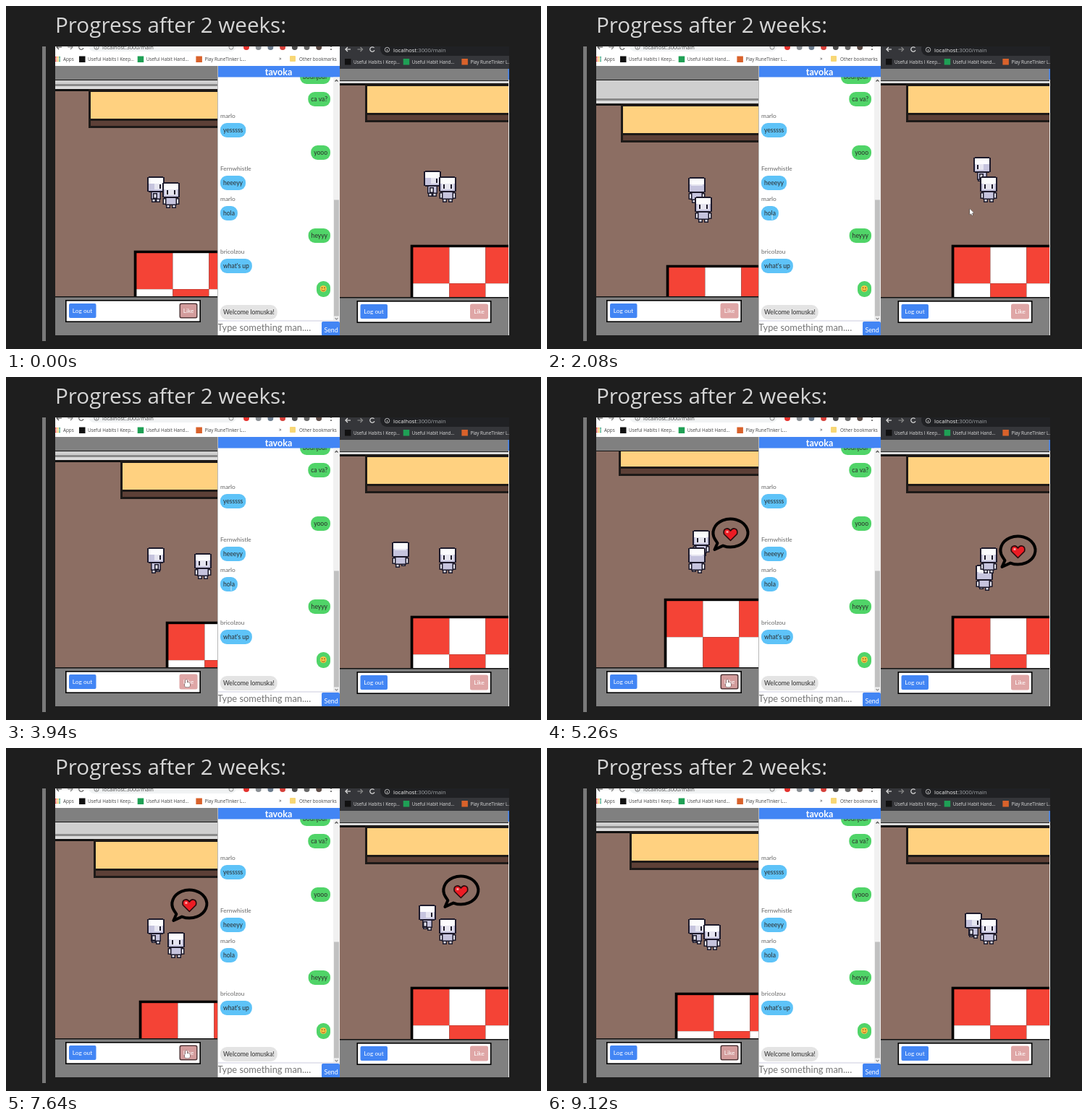
Write an HTML page with a canvas that moves like this. It is 739x475 px and loops after 9580 ms.

```html
<!DOCTYPE html>
<html lang="en">
<head>
<meta charset="utf-8">
<title>Progress after 2 weeks</title>
<style>
html, body { margin: 0; width: 100%; height: 100%; overflow: hidden; background: #1e1e1e; }
canvas { display: block; }
</style>
</head>
<body>
<canvas id="stage" width="739" height="475"></canvas>
<script>
const ctx = document.getElementById('stage').getContext('2d');
const LOOP = 9580;
const STEP = LOOP / 125;
const UI = '"Open Sans", sans-serif';
const CHAT = 'Lato, sans-serif';
const BLUE = '#4285f4', PINK = '#dfa6a6', GREEN = '#50d468';
const LIKED = 5180, LIKE_END = 8270;

// Turning points of the walker relative to the standing player: time, x, y.
const WALK = [
  [690, -21, -8], [1380, 47, -18], [1560, 47, -18], [1880, -9, -18], [2110, -9, -31],
  [2400, 30, -38], [3500, -72, 8], [3760, -72, -8], [3880, -65, -8], [4400, -65, 34],
  [4850, -6, 34], [5180, -6, 24], [5650, -6, 24], [6200, -26, -22], [6640, 41, -22],
  [7250, -45, 15], [7460, -45, -19], [7880, -5, -19], [8500, -70, -8], [9090, -21, -8]
];

const mix = (a, b, k) => a + (b - a) * k;
const ramp = (t, a, b) => Math.min(1, Math.max(0, (t - a) / (b - a)));

function walkAt(t) {
  let i = 1;
  while (i < WALK.length - 1 && t > WALK[i][0]) i++;
  const [t0, x0, y0] = WALK[i - 1], [t1, x1, y1] = WALK[i];
  const k = ramp(t, t0, t1);
  return { x: mix(x0, x1, k), y: mix(y0, y1, k) };
}

function heading(t) {
  const a = walkAt(t - 20), b = walkAt(t);
  const dx = b.x - a.x, dy = b.y - a.y;
  const moving = dx !== 0 || dy !== 0;
  if (!moving) return { dir: t > 5000 && t < 6000 ? 'up' : 'right', moving };
  const dir = Math.abs(dx) > Math.abs(dy) ? (dx > 0 ? 'right' : 'left') : (dy > 0 ? 'down' : 'up');
  return { dir, moving };
}

function box(x, y, w, h, color) {
  ctx.fillStyle = color;
  ctx.fillRect(x, y, w, h);
}

function pill(x, y, w, h, r, color) {
  ctx.fillStyle = color;
  ctx.beginPath();
  ctx.roundRect(x, y, w, h, r);
  ctx.fill();
}

function dot(x, y, r, color) {
  ctx.fillStyle = color;
  ctx.beginPath();
  ctx.arc(x, y, r, 0, 7);
  ctx.fill();
}

function arc(x, y, r, from, to, color, width) {
  ctx.strokeStyle = color;
  ctx.lineWidth = width;
  ctx.beginPath();
  ctx.arc(x, y, r, from, to);
  ctx.stroke();
}

function line(points, color, width) {
  ctx.strokeStyle = color;
  ctx.lineWidth = width;
  ctx.beginPath();
  points.forEach(([x, y]) => ctx.lineTo(x, y));
  ctx.stroke();
}

function chevron(x, y, dx, dy, color) {
  line([[x - dx - dy, y - dy - dx], [x, y], [x - dx + dy, y - dy + dx]], color, 1.3);
}

function text(s, x, y, size, color, font = UI, align = 'left', weight = 400) {
  ctx.font = `${weight} ${size}px ${font}`;
  ctx.textAlign = align;
  ctx.fillStyle = color;
  ctx.fillText(s, x, y);
}

function clipped(x, y, w, h, draw) {
  ctx.save();
  ctx.beginPath();
  ctx.rect(x, y, w, h);
  ctx.clip();
  draw();
  ctx.restore();
}

// x is the middle, y the top of the head; stride is -1, 0 or 1.
function sprite(x, y, dir, stride) {
  const ink = '#1d1a2b', lav = '#c6c4de', pale = '#e6e5f0';
  const part = (px, py, w, h, fill) => {
    box(px, py, w, h, ink);
    box(px + 1.5, py + 1.5, w - 3, h - 3, fill);
  };
  const side = dir === 'left' || dir === 'right';
  ctx.save();
  ctx.translate(Math.round(x), Math.round(y));
  if (dir === 'left') ctx.scale(-1, 1);
  for (const s of [-1, 1]) {
    const lift = stride === s ? 2 : 0;
    if (!side) part(s * 8.5 - 3, 22, 6, 9, pale);
    part(s * (side ? 3 : 4) - 3, 29 - (side ? lift : 0), 6, 7 - (side ? 0 : lift), pale);
  }
  part(side ? -7 : -8, 19, side ? 14 : 16, 13, lav);
  if (side) part(-4 + stride * 2, 23, 6, 8, pale);
  box(-12, 1, 24, 20, ink);
  box(-10, 0, 20, 22, ink);
  box(-10, 2, 20, 18, lav);
  box(-10, 2, 20, 8, '#fbfbfd');
  if (dir === 'up') {
    box(-8, 10, 16, 2, pale);
  } else {
    box(side ? -2 : -8, 10, side ? 11 : 16, 8, pale);
    box(side ? 5 : 4, 11, 2, 6, ink);
    if (!side) box(-6, 11, 2, 6, ink);
  }
  ctx.restore();
}

function heartBubble(x, y) {
  ctx.save();
  ctx.translate(x, y);
  ctx.lineJoin = 'round';
  ctx.strokeStyle = '#000';
  ctx.lineWidth = 4;
  ctx.beginPath();
  ctx.ellipse(0, -1, 24, 19.5, 0, 2.67, 2.02 + Math.PI * 2);
  ctx.lineTo(-22, 22);
  ctx.lineTo(-18, 13);
  ctx.closePath();
  ctx.stroke();
  ctx.beginPath();
  ctx.moveTo(0, 9.5);
  ctx.lineTo(-9, 0.5);
  ctx.bezierCurveTo(-11, -8, -3, -9, 0, -4);
  ctx.bezierCurveTo(3, -9, 11, -8, 9, 0.5);
  ctx.closePath();
  ctx.fillStyle = '#ec1c24';
  ctx.fill();
  ctx.lineWidth = 1.6;
  ctx.strokeStyle = '#2a0a0c';
  ctx.stroke();
  box(-6, -4, 3, 3, '#ff9a9a');
  ctx.restore();
}

// Room in the coordinates of the right-hand window.
function room() {
  box(250, -50, 900, 600, '#8c6e63');
  box(250, -50, 900, 157, '#cfcfcf');
  box(250, 100, 900, 3, '#8a8a8a');
  box(250, 103, 900, 4, '#dcdcdc');
  box(250, 107, 900, 3, '#111');
  box(496, 107, 600, 54, '#1e1a18');
  box(499, 111, 600, 37, '#ffd180');
  box(499, 151, 600, 7, '#5d4037');
  box(558.7, 330.7, 500, 200, '#000');
  for (let r = 0; r < 3; r++)
    for (let c = 0; c < 8; c++)
      box(562.4 + c * 50, 334.2 + r * 50, 50, 50, (r + c) % 2 ? '#fff' : '#f44336');
}

// The remote view turns the walker a little late and keeps its own player on top.
function game(t, remote) {
  const a = walkAt(t);
  const look = heading(remote ? t - 160 : t);
  const stride = look.moving ? Math.floor(t / 150) % 2 * 2 - 1 : 0;
  const walker = () => sprite(610 + a.x, 236 + a.y, look.dir, stride);
  const stander = () => sprite(610, 236, 'down', 0);
  const order = !remote && a.y > 0 ? [stander, walker] : [walker, stander];
  room();
  order.forEach(draw => draw());
  if (t >= LIKED && t < LIKE_END) heartBubble(656.5 + a.x, 217 + a.y);
}

function hud(x, y, w, focused) {
  box(x, y, w, 31, '#000');
  box(x + 1.6, y + 1.6, w - 3.2, 27.8, '#fff');
  pill(x + 5, y + 5, 37.5, 20, 2, BLUE);
  text('Log out', x + 23.5, y + 18, 8.3, '#fff', CHAT, 'center');
  const lx = x + w - 29;
  pill(lx - 0.5, y + 4.5, 25, 21, 2.5, focused ? '#55393b' : PINK);
  pill(lx + 1, y + 6, 22, 18, 1.5, focused ? '#d39c9c' : PINK);
  text('Like', lx + 12, y + 18, 8.3, '#fff', CHAT, 'center');
}

function navIcons(x, y, gap, color) {
  chevron(x, y, -3, 0, color);
  line([[x, y], [x + 7, y]], color, 1.2);
  chevron(x + gap + 7, y, 3, 0, '#888');
  line([[x + gap, y], [x + gap + 7, y]], '#888', 1.2);
  arc(x + 2 * gap + 4, y, 3.2, 0.4, 5.6, color, 1.2);
}

function infoMark(x, y, color) {
  arc(x, y, 3.2, 0, 7, color, 0.9);
  box(x - 0.5, y - 0.5, 1, 2.3, color);
}

function bookmarks(x, y, color) {
  const marks = { 'Useful Habits I Keep...': '#111', 'Useful Habit Hand...': '#1fa055', 'Play RuneTinker L...': '#d9622b' };
  Object.entries(marks).forEach(([name, c], i) => {
    box(x + i * 80.7, y - 6.5, 8.5, 8.5, c);
    text(name, x + i * 80.7 + 12, y, 6.3, color);
  });
}

function leftTop() {
  box(68, 56, 393, 27, '#fff');
  pill(114, 46, 204, 17, 8, '#f1f3f4');
  navIcons(70, 57, 15, '#555');
  infoMark(125, 57, '#666');
  text('localhost:3000/main', 133, 60, 7.5, '#444');
  arc(311, 57, 3, 0, 7, '#777', 0.9);
  ['#e5322d', '#8a8f94', '#6b7b8d', '#d6403a', '#4a4a4a', '#666', '#5b4a45']
    .forEach((c, i) => dot(332 + i * 16.7, 57, 4, c));
  dot(449, 56, 1, '#555');
  dot(449, 60, 1, '#555');
  for (let i = 0; i < 9; i++)
    box(68 + i % 3 * 2.6, 70 + Math.floor(i / 3) * 2.6, 1.8, 1.8, ['#e55', '#fb3', '#4a8'][i % 3]);
  text('Apps', 79, 76, 6.3, '#444');
  bookmarks(101, 76, '#444');
  text('»', 377, 75, 7, '#444');
  pill(392, 69, 8, 8, 1, '#f8d775');
  text('Other bookmarks', 405, 76, 6.3, '#444');
}

function rightTop() {
  box(461, 56, 234, 31, '#35363a');
  pill(517, 50, 200, 19, 9, '#202124');
  navIcons(469, 60, 16.5, '#ddd');
  infoMark(526.5, 60.5, '#ccc');
  text('localhost', 535, 63.5, 7.7, '#f1f1f1');
  text(':3000/main', 535 + ctx.measureText('localhost').width, 63.5, 7.7, '#a0a4a8');
  bookmarks(468, 79.5, '#dcdcdc');
}

function bubble(s, y, color, own) {
  ctx.font = `8.55px ${CHAT}`;
  const w = ctx.measureText(s).width + 8;
  const x = own ? 448 - w : 296;
  pill(x, y, w, 20, 9, color);
  text(s, x + 4, y + 13, 8.55, '#2b2b2b', CHAT);
}

const sent = (s, y) => bubble(s, y, GREEN, true);

function received(name, s, y) {
  text(name, 296, y - 7, 8.4, '#666', CHAT);
  bubble(s, y, '#5ec3f8');
}

function smiley(x, y) {
  dot(x, y, 4.6, '#f9c646');
  for (const s of [-1, 1]) dot(x + s * 1.7, y - 1.2, 0.8, '#5b3a12');
  arc(x, y + 0.3, 2.6, 0.3, 2.8, '#8a4a1c', 0.9);
}

function chat() {
  box(292, 83, 169, 373, '#fff');
  sent('bounjour', 88);
  box(292, 83, 169, 15.5, BLUE);
  text('tavoka', 376.5, 95.5, 12.5, '#fff', CHAT, 'center', 700);
  sent('ca va?', 119);
  received('marlo', 'yesssss', 162);
  sent('yooo', 193);
  received('Fernwhistle', 'heeeyy', 235);
  received('marlo', 'hola', 277);
  sent('heyyy', 308);
  received('bricolzou', "what's up", 350);
  pill(429, 381, 19, 22, 9, GREEN);
  smiley(438.3, 391.5);
  bubble('Welcome lomuska!', 414, '#e4e4e4');
  box(452, 98.5, 9, 337, '#f1f1f1');
  box(453, 268.5, 7, 161, '#c1c1c1');
  chevron(456.5, 102.5, 0, -2, '#555');
  chevron(456.5, 434, 0, 2, '#999');
  box(292, 435.5, 169, 1, '#ccd');
  text('Type something man....', 292, 450, 12.9, '#757575', CHAT);
  pill(436, 437, 25, 20, 2, BLUE);
  text('Send', 449, 451.5, 8.8, '#fff', CHAT, 'center');
  box(292, 83, 1, 373, '#b8b8b8');
}

function pointer(t) {
  if (t < 690 || t >= 8660) return;
  if (t < 4260) box(310.5, 289, 1, 7, 'rgba(255,255,255,.75)');
  const k = ramp(t, 2240, 3090);
  const ease = k * k * (3 - 2 * k);
  ctx.save();
  ctx.translate(mix(584, 250, ease), mix(281, 424, ease));
  ctx.strokeStyle = '#333';
  ctx.lineWidth = 0.9;
  ctx.fillStyle = '#fff';
  ctx.beginPath();
  if (k < 1) {
    [[0, 0], [0, 8], [1.8, 6.3], [3, 9], [4.2, 8.5], [3.1, 5.8], [5.6, 5.6]].forEach(p => ctx.lineTo(...p));
    ctx.closePath();
  } else {
    ctx.roundRect(-3, -1, 7, 6.5, 2);
    ctx.roundRect(-2, -5, 2, 6, 1);
  }
  ctx.stroke();
  ctx.fill();
  ctx.restore();
}

function draw(now) {
  // The picture moves in even steps rather than smoothly.
  const t = (Math.floor(now % LOOP / STEP + 0.35) - 0.35) * STEP;
  const a = walkAt(t);

  box(0, 0, 739, 475, '#1e1e1e');
  box(50, 56, 5, 408, '#7a7a7a');
  text('Progress after 2 weeks:', 68, 36.5, 29.6, '#d6d6d6');

  clipped(68, 56, 627, 400, () => {
    box(68, 56, 627, 400, '#808080');
    clipped(68, 102, 224, 301, () => {
      ctx.translate(Math.round(-403 - a.x), Math.round(0.4 - a.y));
      game(t, false);
    });
    box(68, 102, 224, 1, '#111');
    box(68, 402, 224, 1.5, '#111');
    hud(82, 407, 187, t < 580 || t >= LIKED);
    leftTop();
    chat();

    clipped(461, 104, 233, 299, () => game(t, true));
    box(461, 103, 233, 1, '#222');
    box(461, 403, 233, 1.5, '#111');
    hud(484.5, 408, 186, false);
    rightTop();
    box(694, 87, 1, 369, '#eee');
    box(693.5, 87, 1.5, 15, BLUE);
    pointer(t);
  });
}

const start = performance.now();
function tick() {
  draw(performance.now() - start);
  requestAnimationFrame(tick);
}
tick();
</script>
</body>
</html>
```
